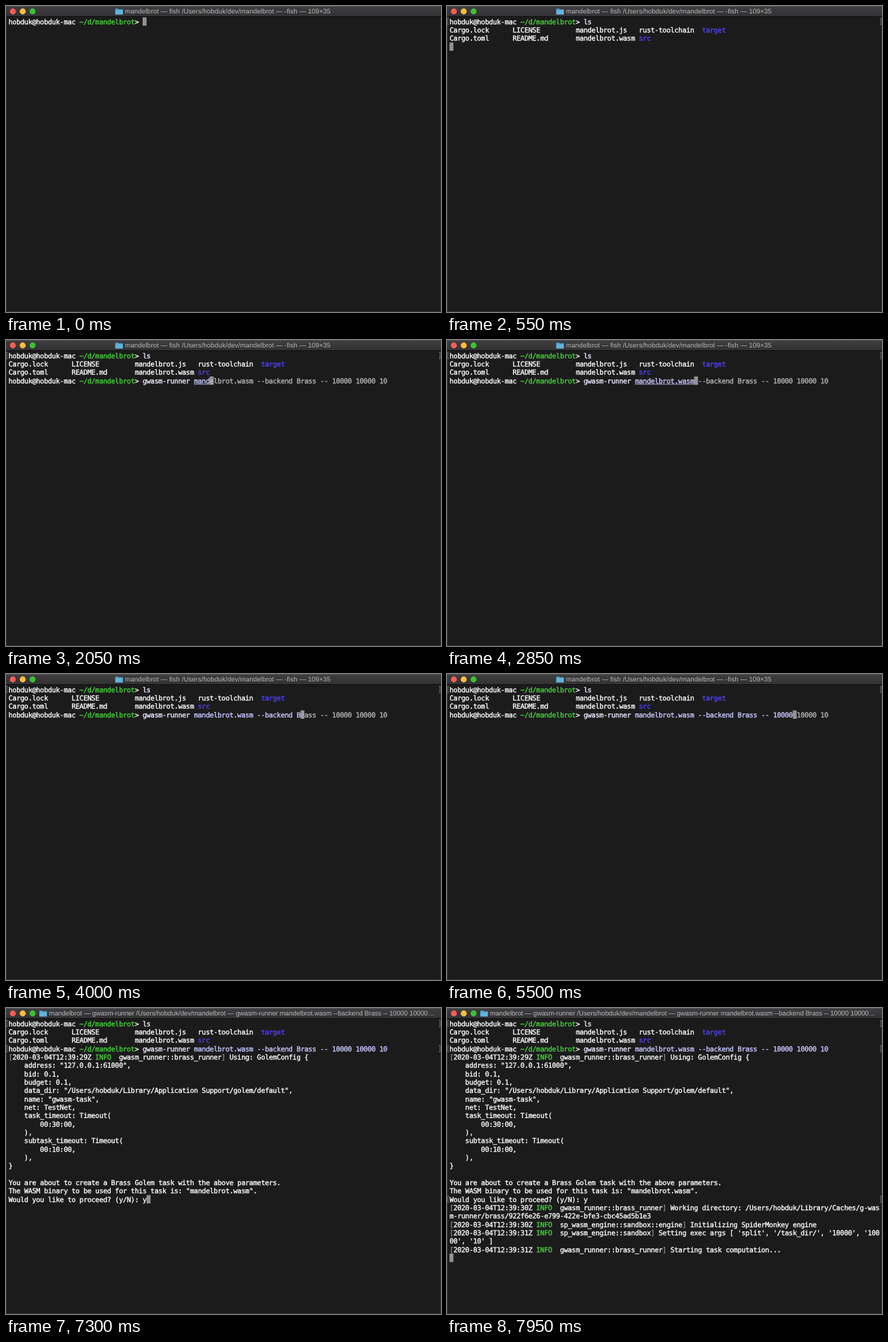
These frames come from a looping animation (640 by 451 pixels, 8 s). An HTML page with a canvas:

```html
<!DOCTYPE html>
<html lang="en">
<head>
<meta charset="utf-8">
<title>Terminal</title>
<style>
html, body { margin: 0; width: 100%; height: 100%; overflow: hidden; background: #1c1b1c; }
canvas { display: block; }
</style>
</head>
<body>
<canvas id="stage" width="640" height="451"></canvas>
<script>
const ctx = document.getElementById('stage').getContext('2d');
const LOOP = 8000, COLS = 109, LEFT = 3.63, TOP = 16.7, CELL = 5.805, ROW = 12.335;
const WHITE = '#fbfbfb', GREEN = '#42d238', BLUE = '#5040f4', DIM = '#8a8a8a';
const COMMAND = '#ececff', PARAM = '#c9c9ff', PARTIAL = '#ffd3a2', HINT = '#b4b4b4';
const USER = 'hobduk';
const CMD = 'gwasm-runner mandelbrot.wasm --backend Brass -- 10000 10000 10';

// [time, characters typed]
const TYPING = [[750, 1], [1250, 7], [2400, 22], [2850, 28], [3150, 31], [3300, 32],
  [4000, 40], [4100, 41], [4650, 45], [4800, 46], [5500, 53], [5600, 54],
  [6150, 59], [6300, 60], [6500, 62]];

const CONFIG = ` {
    address: "127.0.0.1:61000",
    bid: 0.1,
    budget: 0.1,
    data_dir: "/Users/${USER}/Library/Application Support/golem/default",
    name: "gwasm-task",
    net: TestNet,
    task_timeout: Timeout(
        00:30:00,
    ),
    subtask_timeout: Timeout(
        00:10:00,
    ),
}

You are about to create a Brass Golem task with the above parameters.
The WASM binary to be used for this task is: "mandelbrot.wasm".
Would you like to proceed? (y/N): `;

let row, col;

// A thin outline gives the letters their heavier weight
function print(text, color = WHITE) {
  ctx.fillStyle = ctx.strokeStyle = color;
  ctx.lineWidth = 0.35;
  for (const ch of text) {
    if (ch === '\n') { row++; col = 0; continue; }
    if (col === COLS) { row++; col = 0; }
    if (ch !== ' ') {
      const x = LEFT + col * CELL, y = TOP + row * ROW + 9.8;
      ctx.fillText(ch, x, y);
      ctx.strokeText(ch, x, y);
    }
    col++;
  }
}

function cursor() {
  ctx.fillStyle = '#929292';
  ctx.fillRect(LEFT + col * CELL, TOP + row * ROW, CELL, ROW);
}

function prompt() {
  print(`${USER}@${USER}-mac `);
  print('~/d/mandelbrot', GREEN);
  print('> ');
}

// Brackets in the margins beside a line that was entered
function mark() {
  const y = TOP + row * ROW + 1.3;
  ctx.strokeStyle = '#858585';
  ctx.lineWidth = 0.8;
  for (const [x, dx] of [[1.3, 1.5], [638.4, -1.5]]) {
    ctx.beginPath();
    ctx.moveTo(x + dx, y);
    ctx.lineTo(x, y);
    ctx.lineTo(x, y + 9.7);
    ctx.lineTo(x + dx, y + 9.7);
    ctx.stroke();
  }
}

function log(sec, module, message) {
  print('[', DIM);
  print(`2020-03-04T12:39:${sec}Z `);
  print('INFO', GREEN);
  print('  ' + module);
  print(']', DIM);
  print(' ' + message);
}

function typedAt(t) {
  if (t < TYPING[0][0]) return 0;
  for (let i = 1; i < TYPING.length; i++) {
    const [t0, n0] = TYPING[i - 1], [t1, n1] = TYPING[i];
    if (t < t1) return Math.floor(n0 + (n1 - n0) * (t - t0) / (t1 - t0));
  }
  return CMD.length;
}

function listing() {
  print('Cargo.lock      LICENSE         mandelbrot.js   rust-toolchain  ');
  print('target\n', BLUE);
  print('Cargo.toml      README.md       mandelbrot.wasm ');
  print('src\n', BLUE);
}

function commandLine(t) {
  prompt();
  const n = typedAt(t), start = col;
  if (t < 6650) {
    col += n;
    cursor();
    col = start;
  }
  const name = CMD.slice(0, Math.min(n, 12));
  print(name, n < 12 ? PARTIAL : COMMAND);
  print(CMD.slice(name.length, n), PARAM);
  if (n) print(CMD.slice(n), HINT);
  // The file name is underlined while it is being typed
  if (n > 13 && n < 29) {
    ctx.fillStyle = PARAM;
    ctx.fillRect(LEFT + (start + 13) * CELL, TOP + row * ROW + 11, (n - 13) * CELL, 0.8);
  }
}

function session(t) {
  row = col = 0;
  ctx.font = '10.16px "DejaVu Sans Mono", monospace';
  ctx.letterSpacing = '0px';
  prompt();
  if (t >= 200) print('l', COMMAND);
  if (t >= 300) print('s', COMMAND);
  if (t < 450) return cursor();
  mark();
  print('\n');
  if (t >= 500) listing();
  if (t < 600) return cursor();

  commandLine(t);
  if (t < 6650) return;
  mark();
  print('\n');
  if (t < 6750) return cursor();

  log(29, 'gwasm_runner::brass_runner', 'Using: GolemConfig' + CONFIG);
  if (t >= 7300) print('y');
  if (t < 7450) return cursor();
  mark();
  print('\n');
  if (t >= 7500) {
    log(30, 'gwasm_runner::brass_runner', `Working directory: /Users/${USER}/Library/Caches/` +
      'g-wasm-runner/brass/922f6e26-e799-422e-bfe3-cbc45ad5b1e3\n');
    log(30, 'sp_wasm_engine::sandbox::engine', 'Initializing SpiderMonkey engine\n');
  }
  if (t >= 7900)
    log(31, 'sp_wasm_engine::sandbox', "Setting exec args [ 'split', '/task_dir/', '10000', '10000', '10' ]\n");
  if (t >= 7950) log(31, 'gwasm_runner::brass_runner', 'Starting task computation...\n');
  cursor();
}

function folder(x) {
  ctx.fillStyle = '#4c9fc9';
  ctx.fillRect(x, 3.8, 4.8, 3);
  ctx.fillRect(x, 4.8, 11, 7.6);
  ctx.fillStyle = '#62b4dc';
  ctx.fillRect(x, 6.2, 11, 6.2);
}

function titleBar(t) {
  const shade = ctx.createLinearGradient(0, 0, 0, 16);
  shade.addColorStop(0, '#3e3d3f');
  shade.addColorStop(1, '#323133');
  ctx.fillStyle = shade;
  ctx.fillRect(0, 0, 640, 16);
  ctx.fillStyle = '#565557';
  ctx.fillRect(0, 0, 640, 1);
  ctx.fillStyle = '#0f0f0f';
  ctx.fillRect(0, 15, 640, 1);
  ['#fc5b56', '#fdbd3e', '#3bc232'].forEach((color, i) => {
    ctx.fillStyle = color;
    ctx.beginPath();
    ctx.arc(10.1 + i * 14.5, 8, 4.4, 0, 7);
    ctx.fill();
  });
  const running = t >= 6700, x = running ? 63.3 : 175;
  const [app, job] = running
    ? ['gwasm-runner', CMD.slice(0, -3) + '…']
    : ['fish', '-fish — 109×35'];
  folder(x - 14.2);
  ctx.font = '9.8px "Liberation Sans", Arial, sans-serif';
  // The long title is set a little tighter
  ctx.letterSpacing = running ? '-0.06px' : '0.08px';
  ctx.fillStyle = '#b8b7b8';
  ctx.fillText(`mandelbrot — ${app} /Users/${USER}/dev/mandelbrot — ${job}`, x, 11.4);
}

function draw(now) {
  const t = now % LOOP;
  ctx.textRendering = 'geometricPrecision';
  ctx.lineJoin = 'round';
  ctx.fillStyle = '#1c1b1c';
  ctx.fillRect(0, 0, 640, 451);
  ctx.strokeStyle = '#353435';
  ctx.lineWidth = 1;
  ctx.strokeRect(0.5, 0.5, 639, 450);
  titleBar(t);
  session(t);
  requestAnimationFrame(draw);
}
requestAnimationFrame(draw);
</script>
</body>
</html>
```
